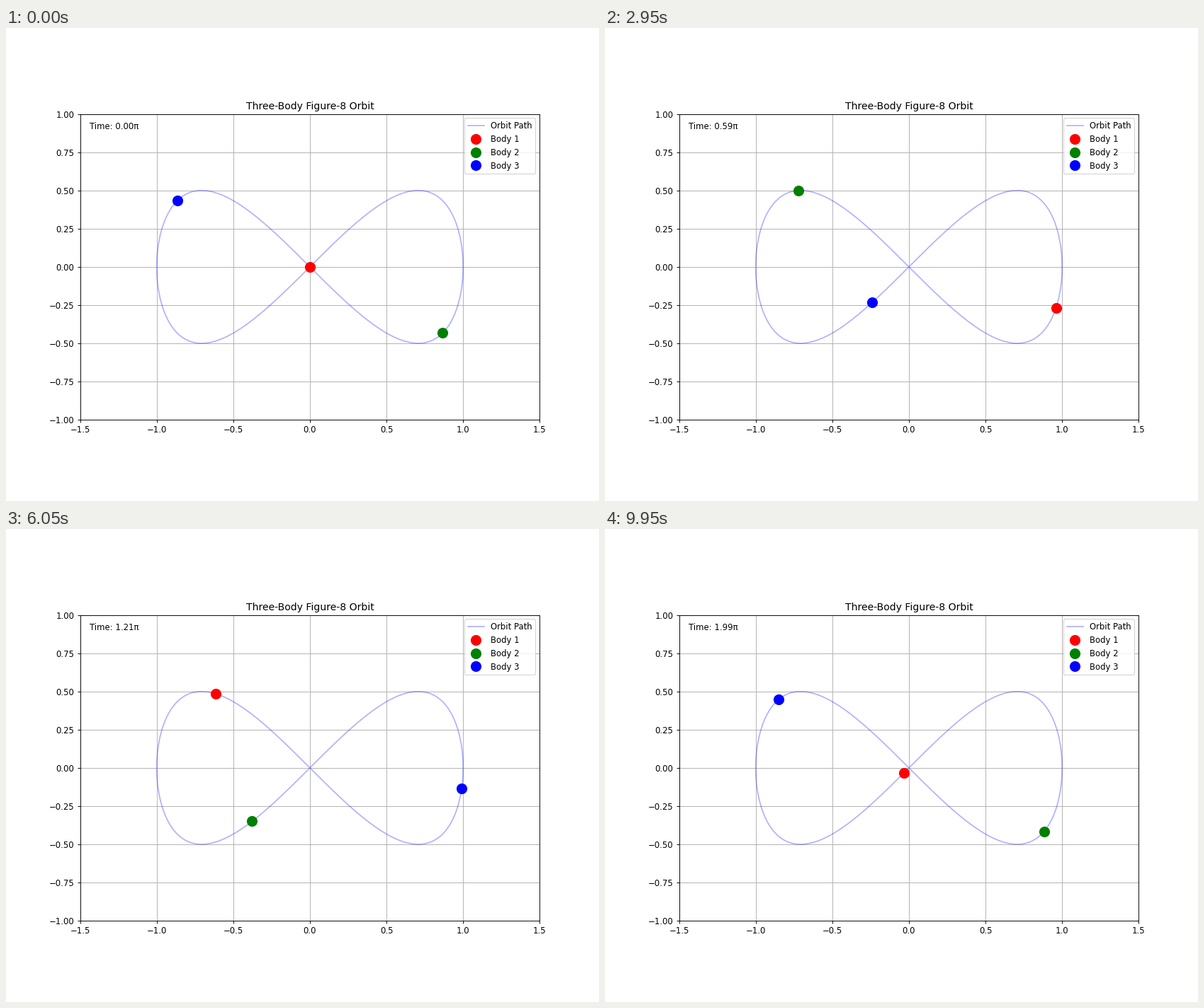
Write a matplotlib script that moves like this. It is 837 by 669 pixels and loops after 10000 ms.

```python
import numpy as np
import matplotlib.pyplot as plt
from matplotlib.animation import FuncAnimation

WIDTH, HEIGHT, DPI = 837, 669, 83.7
FRAMES, INTERVAL = 200, 50
EPS = 1e-6  # keeps the pixel size from rounding down

plt.rcParams["font.family"] = "DejaVu Sans"


def orbit(t):
    """Figure-8 curve (lemniscate of Gerono)."""
    return np.sin(t), np.sin(t) * np.cos(t)


fig, ax = plt.subplots(figsize=((WIDTH + EPS) / DPI, (HEIGHT + EPS) / DPI), dpi=DPI)
ax.set_xlim(-1.5, 1.5)
ax.set_ylim(-1, 1)
ax.set_aspect("equal")
ax.grid(True)
ax.set_title("Three-Body Figure-8 Orbit")

ax.plot(*orbit(np.linspace(0, 2 * np.pi, 1000)), "b-", alpha=0.3, label="Orbit Path")
bodies = [
    ax.plot([], [], "o", color=color, markersize=12, label=f"Body {n}")[0]
    for n, color in enumerate(("red", "green", "blue"), 1)
]
clock = ax.text(0.02, 0.95, "", transform=ax.transAxes)
ax.legend(loc="upper right")


def update(frame):
    t = 2 * np.pi * frame / FRAMES
    for k, body in enumerate(bodies):
        x, y = orbit(t + k * 2 * np.pi / 3)
        body.set_data([x], [y])
    clock.set_text(f"Time: {t / np.pi:.2f}π")
    return [*bodies, clock]


anim = FuncAnimation(fig, update, frames=FRAMES, interval=INTERVAL, repeat=True, repeat_delay=0)
plt.show()
```
